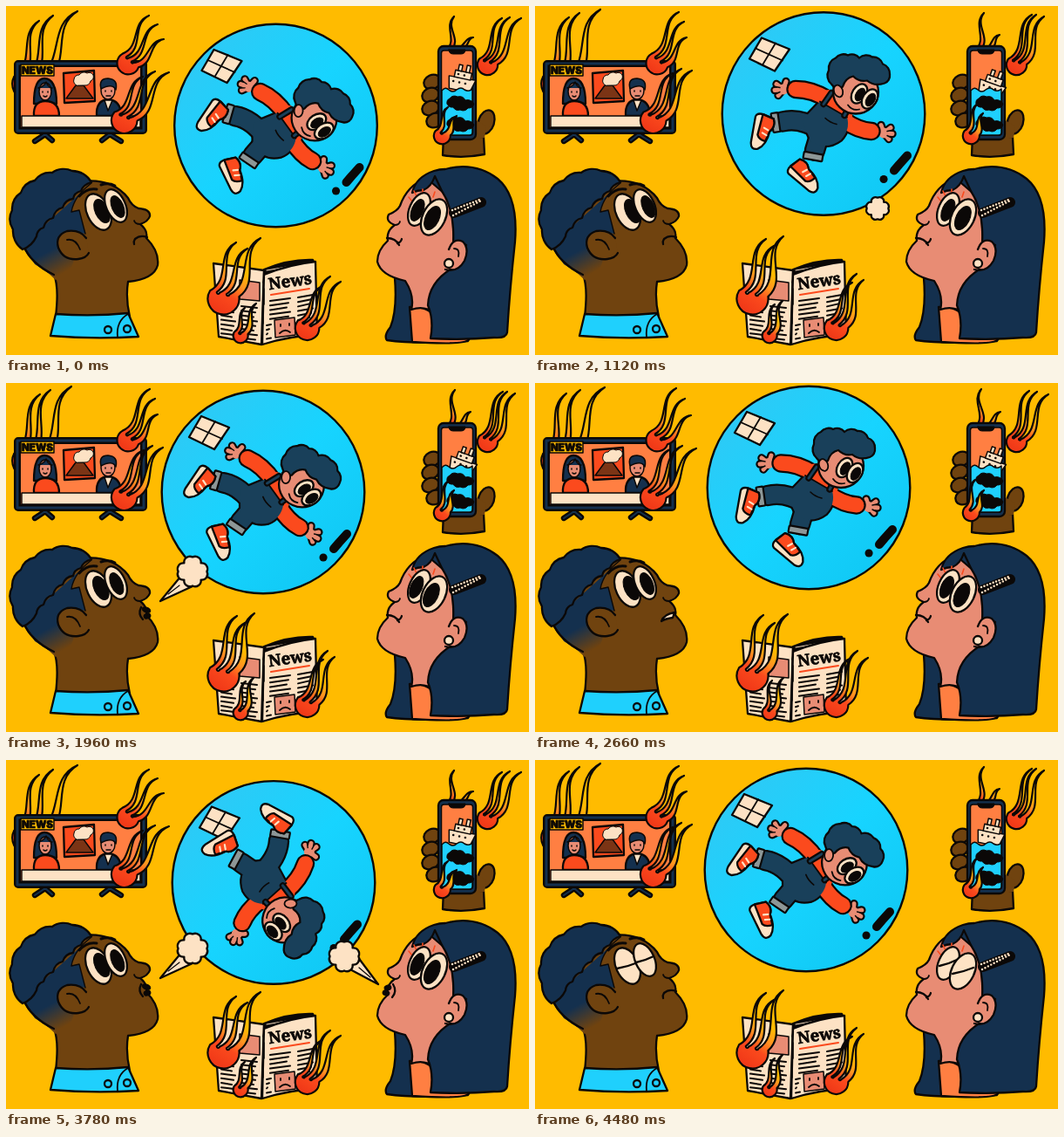
Animation of 600 by 400 pixels, one loop 4620 ms. Source, as an HTML page:

```html
<!DOCTYPE html>
<html lang="en">
<head>
<meta charset="utf-8">
<style>
html, body { margin: 0; width: 100%; height: 100%; overflow: hidden; background: #fb0; }
svg { display: block; width: 600px; height: 400px; }
</style>
</head>
<body>
<svg id="stage" viewBox="0 0 600 400" stroke-linejoin="round" stroke-linecap="round"></svg>
<script>
const STEP = 140, STEPS = 33;
const INK = '#0b0807', NAVY = '#14304e', TEAL = '#19405a', CREAM = '#fde2c4', RED = '#fb4a1d', ORANGE = '#ff7f42',
  CYAN = '#1fd0fd', BROWN = '#70430f', SKIN = '#e88c74', GOLD = '#fb0', GREY = '#8d9797', NONE = 'none';

// step, bubble x, bubble y, boy's rotation
const FLIGHT = [
  [0, 309.5, 137, 24], [4, 326, 147, 12], [8, 331, 123.5, 0], [11, 312, 142, 12], [14, 295, 125, 24],
  [19, 314, 120, 0], [24, 307, 147, 0], [29, 307, 137, 180], [32, 311, 126, 384], [33, 309.5, 137, 384]
];

const path = (d, fill = NONE, w = 2.3, stroke = INK) =>
  `<path d="${d}" fill="${fill}" stroke="${stroke}" stroke-width="${w}"/>`;
const oval = (x, y, rx, ry, fill, turn = 0, w = 2.3) =>
  `<ellipse cx="${x}" cy="${y}" rx="${rx}" ry="${ry}" fill="${fill}" stroke="${INK}" stroke-width="${w}" transform="rotate(${turn} ${x} ${y})"/>`;
const box = (x, y, w, h, fill, line = 2, r = 0) =>
  `<rect x="${x}" y="${y}" width="${w}" height="${h}" rx="${r}" fill="${fill}" stroke="${INK}" stroke-width="${line}"/>`;
const group = (transform, ...parts) => `<g transform="${transform}">${parts.join('')}</g>`;
const limb = (d, color, w) => path(d, NONE, w + 4.4) + path(d, NONE, w, color);
const label = (x, y, size, family, text) =>
  `<text x="${x}" y="${y}" font-size="${size}" font-weight="900" font-family="${family}" fill="${INK}" stroke="${INK}" stroke-width=".7">${text}</text>`;
const within = (k, ...ranges) => ranges.some(([a, b]) => k >= a && k <= b);

// Outline made of rounded bumps between neighbouring points
function bumps(points, flat = 1) {
  return points.map(([x, y], i) => {
    if (!i) return `M${x},${y}`;
    const r = Math.hypot(x - points[i - 1][0], y - points[i - 1][1]) * flat;
    return `A${r},${r} 0 0 1 ${x},${y}`;
  }).join('');
}

function cloud(x, y, r) {
  const ring = Array.from({ length: 9 }, (_, i) => {
    const a = i * Math.PI / 4, q = r * (i % 2 ? .68 : .82);
    return [x + q * Math.cos(a), y + q * Math.sin(a)];
  });
  return path(bumps(ring, .56) + 'Z', CREAM);
}

function wave([x, y], [u, v]) {
  const dx = u - x, dy = v - y, w = .24;
  return `C${x + dx * .35 - dy * w},${y + dy * .35 + dx * w} ${x + dx * .65 + dy * w},${y + dy * .65 - dx * w} ${u},${v}`;
}

// A round root with wavy tongues; the tips flicker through three poses
function flame(k, x, y, w, ...tips) {
  const pose = k % 3, n = tips.length;
  const ends = tips.map(([u, v], i) =>
    pose === 2 ? [u + 1 - 4 * i, v - 4 + i] : pose ? [u - 2, v - 5 + 2 * i] : [u, v]);
  const angle = Math.atan2(tips[n - 1][1] - y, tips[0][0] - x), c = Math.cos(angle), s = Math.sin(angle);
  const root = q => [x - s * w * q + c * w * .5, y + c * w * q + s * w * .5];
  const slot = 2 / n, gap = slot * .3;
  let d = `M${root(-1)}`;
  ends.forEach((tip, i) => {
    const right = root((i + 1) * slot - 1 - (i < n - 1 ? gap : 0));
    d += wave(root(i * slot - 1), tip) + wave(tip, right);
    if (i < n - 1) d += `A${w * gap / 2},${w * gap / 2} 0 0 0 ${root((i + 1) * slot - 1)}`;
  });
  return path(d + `A${w * 1.06},${w * 1.06} 0 1 1 ${root(-1)}Z`, 'url(#fire)', 2.2);
}

function eye(x, y, rx, ry, turn, dx, dy, shut) {
  return oval(x, y, rx, ry, CREAM, turn) + (shut
    ? path(`M${x - rx + 1},${y + 3} Q${x},${y + 1} ${x + rx - 1},${y - 4}`)
    : oval(x + dx, y + dy, rx * .6, ry * .66, INK, turn, 1));
}

function television(k) {
  return flame(k, 26, 92, 18, [38, 17], [54, 11], [82, 6])
    + limb('M33,155 L45,147 L53,154 M110,154 L119,147 L132,155', NAVY, 2)
    + box(13, 66, 145, 77, ORANGE, 8, 1) + path('M13,66 H158 V143 H13Z', NONE, 3, NAVY)
    + box(17, 67, 38, 13, GOLD, 1.5) + label(18, 78, 11.5, 'Inter, sans-serif', 'NEWS')
    // presenters and the picture between them
    + path('M32,112 Q32,83 44,83 Q58,83 58,112Z', NAVY)
    + path('M32,126 Q31,109 45,109 Q61,109 61,126Z', RED)
    + oval(45, 98, 7, 10, SKIN, 0, 1.5) + path('M37,94 Q44,92 46,87 Q49,94 53,94', NAVY, 1.5)
    + path('M42,98 v1 M48,98 v1 M43,103 q2,2 4,0', NONE, 1.5)
    + path('M66,77 L101,74 L102,109 L67,111Z', RED) + path('M69,106 L80,91 H89 L100,106Z', '#7b3415', 1.5)
    + path(bumps([[81, 91], [78, 84], [84, 79], [93, 77], [100, 79], [97, 86], [90, 91]], .7) + 'Z', CREAM, 1)
    + path('M104,126 Q103,108 117,107 Q132,108 132,126Z', NAVY)
    + path('M113,108 L117,120 L122,108Z', CREAM, 1.5)
    + oval(117, 97, 8, 10, SKIN, 0, 1.5) + path('M109,95 Q106,83 117,83 Q129,84 126,96 Q122,88 109,95Z', NAVY, 1.5)
    + path('M114,97 v1 M121,97 v1 M115,103 h5', NONE, 1.5)
    + box(18, 126, 136, 13, CREAM, 1.5)
    + flame(k, 139, 67, 12, [164, 11], [174, 21], [181, 38])
    + flame(k, 135, 133, 14, [157, 81], [171, 75], [187, 76]);
}

function phone(k) {
  const ship = within(k, [5, 26]) ? 'translate(525 89) rotate(20)' : 'translate(523 83) rotate(12)';
  const fish = y => path(bumps([[506, y], [509, y - 6], [518, y - 8], [527, y - 4], [537, y], [530, y + 5], [521, y + 7], [513, y + 4], [506, y]], .8), INK, 1);
  return flame(k, 515, 54, 9, [514, 12], [536, 36])
    + path('M502,148 L501,171 Q524,175 549,170 L548,150Z', BROWN) + oval(551, 133, 9, 14, BROWN, 18)
    + path('M530,153 L549,151 L551,138 L538,130Z', BROWN, 0)
    + [[489, 87], [487, 102], [487, 117], [492, 131]].map(([x, y]) => oval(x, y, 10, 8, BROWN, -25)).join('')
    + box(496, 46, 43, 107, NAVY, 2.3, 6) + box(499.5, 51, 36, 97, ORANGE, 1.5, 3)
    + path('M508,50 H527 Q527,55 522,55 H513 Q508,55 508,50Z', INK, 1)
    + group(ship, path('M-15,0 L16,-1 L12,14 H-12Z', CREAM, 1.5), box(-9, -8, 19, 8, CREAM, 1.5),
        box(-6, -15, 4, 7, CREAM, 1.5), box(3, -16, 4, 8, CREAM, 1.5),
        path('M-9,5 h.1 M-2,5 h.1 M5,5 h.1 M-5,-4 h.1 M2,-4 h.1', NONE, 2.5))
    + path('M500,97 q4,-5 8,-1 q5,4 9,0 q5,-4 9,0 q5,3 9,-1 V145 Q535,148 532,148 H503 Q500,148 500,145Z', CYAN, 1.5)
    + fish(112) + fish(136)
    + flame(k, 552, 69, 11, [569, 14], [578, 13], [591, 14])
    + flame(k, 500, 150, 9, [507, 116], [517, 126]);
}

function newspaper(k) {
  const rows = (x, y, n, w, slope) => Array.from({ length: n }, (_, i) =>
    `M${x},${y + i * 5.2} l${w - i % 3 * 2},${slope}`).join('');
  return path('M238,295 L296,303 L293,388 L244,379Z', CREAM)
    + path('M296,302 Q325,290 352,291 L355,296 L296,308Z', INK)
    + path('M299,303 L350,294', NONE, 1, CREAM)
    + path('M296,308 Q325,296 355,293 L357,377 Q325,378 294,388Z', CREAM)
    + path('M268,314 L291,317 V338 L268,336Z', SKIN, 1.5)
    + path(rows(247, 344, 7, 16, 2) + rows(270, 344, 8, 18, 2), NONE, 2)
    + group('rotate(-8 303 325)', label(302, 325, 18.5, "'Noto Serif', serif", 'News'))
    + path('M304,331 L348,324', NONE, 2, RED)
    + path(rows(303, 338, 5, 23, -3) + rows(335, 334, 8, 17, -3) + rows(299, 366, 4, 5, -1), NONE, 2)
    + path('M308,360 L331,357 L332,377 L309,380Z', SKIN, 1.5)
    + path('M315,365 v2 M325,364 v2 M314,375 q6,-6 12,-1', NONE, 1.8)
    + path('M296,312 l-1,5 M296,324 v18 M295,356 v8', NONE, 1.5)
    + flame(k, 249, 338, 17, [264, 271], [277, 278], [292, 266])
    + flame(k, 269, 379, 8, [274, 346], [287, 341])
    + flame(k, 345, 371, 13, [363, 321], [372, 310], [384, 316]);
}

function man(k, gaze, shut) {
  const blowing = within(k, [12, 15], [21, 30]), open = within(k, [10, 11], [17, 20]);
  const mouth = blowing
    ? oval(161, 260, 5, 3, INK, 20, 1) + oval(162, 267, 4, 3, INK, -20, 1) + path('M155,257 q-4,8 2,14')
    : open ? path('M145,273 Q148,265 160,263 L158,269 Q150,270 145,273Z', CREAM)
      : path('M148,267 Q154,262 162,265 M148,267 q-2,3 -1,6');
  return path('M80,202 Q120,195 140,220 Q144,229 152,232 Q166,233 165,241 Q163,247 154,250 Q163,257 161,266 Q176,281 174,297 Q170,313 140,316 Q137,335 142,356 H57 Q61,322 55,308 Q28,295 20,274Z', BROWN)
    + path('M20,273 L98,203 Q78,218 75,236 L84,234 L91,261 Q62,256 61,277 L78,290 Q76,306 57,314 Q45,302 33,296Z', 'url(#fade)', 0)
    + path('M55,308 Q28,295 20,274')
    + path(bumps([[19, 279], [8, 256], [7, 234], [17, 214], [33, 200], [53, 191], [76, 189], [98, 202]])
      + 'Q88,205 86,212 Q78,214 77,221 Q68,222 65,231 Q56,233 54,243 Q45,245 43,254 Q36,256 35,264 Q30,275 19,279Z', NAVY)
    + path('M98,203 Q78,218 75,236 L84,234 L91,261', NONE, 1.4)
    + path('M92,266 Q85,256 70,258 Q56,263 60,277 Q66,292 83,290 Q92,289 95,283', BROWN)
    + path('M70,268 Q80,266 85,279', NONE, 1.8)
    + path('M84,218 Q93,208 104,210 M109,205 Q118,202 125,206', NONE, 3)
    + eye(106, 236, 13, 22, -25, 4 + gaze, -1, shut) + eye(126, 229, 11, 20, -24, 2 + gaze, 1, shut)
    + mouth + path('M154,250 q-6,0 -7,-4', NONE, 1.8)
    + path('M57,353 Q100,356 140,352 L152,379 Q100,382 51,378Z', CYAN)
    + path('M140,353 Q126,361 128,380', NONE, 1.8)
    + oval(117, 371, 4, 4, CYAN) + oval(139, 370, 4, 4, CYAN);
}

function girl(k, gaze, shut) {
  const blowing = within(k, [4, 7], [21, 30]);
  const mouth = blowing
    ? oval(438, 261, 4, 3, INK, -20, 1) + oval(436, 267, 4, 3, INK, 20, 1) + path('M444,257 q5,8 -1,15')
    : path('M437,266 Q447,266 451,274 M449,272 q4,-1 5,-5');
  const beads = Array.from({ length: 10 }, (_, i) =>
    `M${513 + i * 3.4},${240 - i * 1.8} h.1 M${512 + i * 3.4},${234 - i * 1.3} h.1`).join('');
  return path('M470,208 Q481,190 495,190 L580,300 L530,384 Q470,388 437,383 Q433,378 441,368 Q449,348 446,312Z', NAVY)
    + path('M463,345 Q484,344 492,356 L531,382 Q528,389 466,385Z', ORANGE)
    + path('M482,197 Q460,206 452,229 Q449,235 439,239 Q435,247 446,251 Q436,258 438,269 Q426,280 426,293 Q430,309 458,315 Q469,332 465,348 Q480,343 492,352 L526,276 Q520,240 503,215Z', SKIN)
    + path('M466,214 Q470,196 491,189 Q497,187 504,187 Q538,178 564,198 Q588,218 584,270 Q578,325 575,374 Q574,381 560,380 Q525,383 487,381 Q491,360 484,343 Q485,317 511,301 L528,274 Q516,268 513,272 Q515,235 500,212 L492,195 Q488,207 479,211 Q472,211 466,214Z', NAVY)
    + path('M504,299 Q518,306 526,292 Q532,278 524,270 Q513,265 508,279Z', SKIN, 0)
    + path('M504,302 Q518,306 526,292 Q532,278 524,270 Q513,265 508,279')
    + path('M514,278 q7,0 5,9', NONE, 1.8) + oval(508, 295, 5, 5, CREAM)
    + path('M466,224 l-4,-5 M471,218 l-3,-6 M478,216 v-6 M490,219 l2,-6', NONE, 1.6, RED)
    + eye(474, 233, 11, 20, 24, gaze - 2, 1, shut) + eye(491, 242, 13, 22, 26, gaze - 2, 1, shut)
    + path('M514,237 L545,225', NONE, 12) + path(beads, NONE, 2.4, CREAM)
    + mouth + path('M446,251 q5,0 6,-4', NONE, 1.8);
}

function shoe(x, y, turn) {
  return group(`translate(${x} ${y}) rotate(${turn})`,
    path('M-17,-9 Q-8,-13 -2,-7 Q14,-6 20,3 Q23,11 14,12 H-16 Q-21,11 -20,3Z', CREAM),
    path('M-17,-9 Q-8,-13 -2,-7 L10,-4 Q9,4 4,6 L-20,4Z', RED),
    path('M-3,-5 l-2,5 M3,-4 l-2,5', NONE, 2.2, CREAM));
}

const cuff = (x, y, turn) => group(`translate(${x} ${y}) rotate(${turn})`, box(-4, -11, 8, 22, GREY, 2.2, 1));

function boy(turn) {
  const torso = 'M-4,-14 L27,4 Q31,18 20,30 Q4,42 -14,32 L-25,8Z';
  const hand = (x, y, side) => {
    const fingers = [[3, -9], [-8, -6], [-10, 1], [-6, 7]].map(([u, v]) => `M${x},${y} l${u * side},${v}`).join('');
    return limb(fingers, SKIN, 5) + oval(x, y, 6, 6, SKIN, 0, 0)
      + path(`M${x - 4 * side},${y - 2} l${-5 * side},-1 M${x - 4 * side},${y + 3} l${-4 * side},2`, NONE, 1.4);
  };
  return group(`rotate(${turn})`,
    hand(-46, -28, 1), hand(69, 22, -1),
    path(torso, TEAL, 4.4), limb('M-4,18 Q-28,4 -47,9 M-4,22 L-10,42', TEAL, 20),
    cuff(-55, 10, -8), shoe(-69, 21, 100), cuff(-12, 49, 100), shoe(-20, 70, 40),
    limb('M6,-16 Q-13,-28 -32,-28', RED, 17), limb('M24,8 Q40,19 55,20', RED, 17),
    path('M0,-26 Q22,-33 32,-6 Q36,8 27,18 L-6,-6Z', RED, 0),
    path(torso, TEAL, 0), path('M-4,-14 L27,4', NONE, 1.8),
    limb('M0,-11 L9,-24 M24,2 L30,-9', TEAL, 3), path('M2,5 q5,5 13,7', NONE, 1.6),
    oval(37, -25, 26, 25, SKIN),
    path(bumps([[9, -34], [6, -50], [14, -64], [28, -67], [41, -64], [56, -65], [68, -57], [76, -45], [70, -35]], .8)
      + 'Q58,-31 50,-38 Q41,-36 34,-43 Q25,-41 22,-31 Q15,-26 9,-34Z', TEAL),
    oval(17, -26, 5, 7, SKIN, -20, 1.8),
    eye(41, -23, 8, 12, 32, 1, 1), eye(53, -17, 8, 12, 32, 1, 1),
    path('M28,-10 q5,7 13,5', NONE, 1.8));
}

function bubble(x, y, turn) {
  return group(`translate(${x} ${y})`,
    `<circle r="116.3" fill="url(#sheen)" stroke="${INK}" stroke-width="2.4"/>`,
    path('M-85,-63 L-71,-87 L-39,-74 L-56,-49Z', CREAM), path('M-78,-75 L-47,-61 M-55,-81 L-70,-56', NONE, 1.8),
    path('M69,75 h.1', NONE, 9), path('M81,65 L87,58 L96,48', NONE, 10),
    boy(turn));
}

function puffs(k) {
  let art = '';
  if (within(k, [12, 15], [21, 30])) art += path('M177,250 L201,221 L214,233Z', CREAM) + path('M186,242 l13,-10', NONE, 1.2) + cloud(214, 216, 20);
  if (within(k, [4, 7], [21, 30])) art += path('M427,257 L391,238 L403,225Z', CREAM) + path('M418,249 l-13,-11', NONE, 1.2) + cloud(388, 225, 20);
  if (k === 16) art += cloud(209, 223, 15);
  if (k === 8) art += cloud(393, 232, 15);
  return art;
}

function flight(k) {
  const i = FLIGHT.findIndex(key => key[0] > k), a = FLIGHT[i - 1], b = FLIGHT[i];
  const t = (k - a[0]) / (b[0] - a[0]), s = (1 - Math.cos(Math.PI * t)) / 2;
  return [a[1] + (b[1] - a[1]) * s, a[2] + (b[2] - a[2]) * s, a[3] + (b[3] - a[3]) * t];
}

const stop = (at, color) => `<stop offset="${at}" stop-color="${color}"/>`;
const DEFS = `<defs>
<linearGradient id="fire" x1=".1" y1="1" x2=".5" y2=".1">${stop(.1, '#f13a18') + stop(.36, RED) + stop(.55, '#ff9322') + stop(.75, GOLD)}</linearGradient>
<linearGradient id="fade" gradientUnits="userSpaceOnUse" x1="46" y1="274" x2="64" y2="307">${stop(.2, NAVY) + stop(1, BROWN)}</linearGradient>
<linearGradient id="sheen" x1=".1" y1=".1" x2=".9" y2=".9">${stop(0, '#2fc9f5') + stop(.5, '#17d4ff') + stop(1, '#10c8f4')}</linearGradient>
</defs>`;

const stage = document.getElementById('stage');
let shown = -1;

function draw(now) {
  const k = Math.floor(now / STEP) % STEPS;
  if (k !== shown) {
    shown = k;
    const [x, y, turn] = flight(k), gaze = (x - 309) / 12, shut = k === 32;
    stage.innerHTML = DEFS + `<rect width="600" height="400" fill="${GOLD}"/>`
      + television(k) + phone(k) + newspaper(k) + man(k, gaze, shut) + girl(k, gaze, shut)
      + bubble(x, y, turn) + puffs(k);
  }
}

const start = performance.now();
function tick() {
  draw(performance.now() - start);
  requestAnimationFrame(tick);
}
tick();
</script>
</body>
</html>
```
